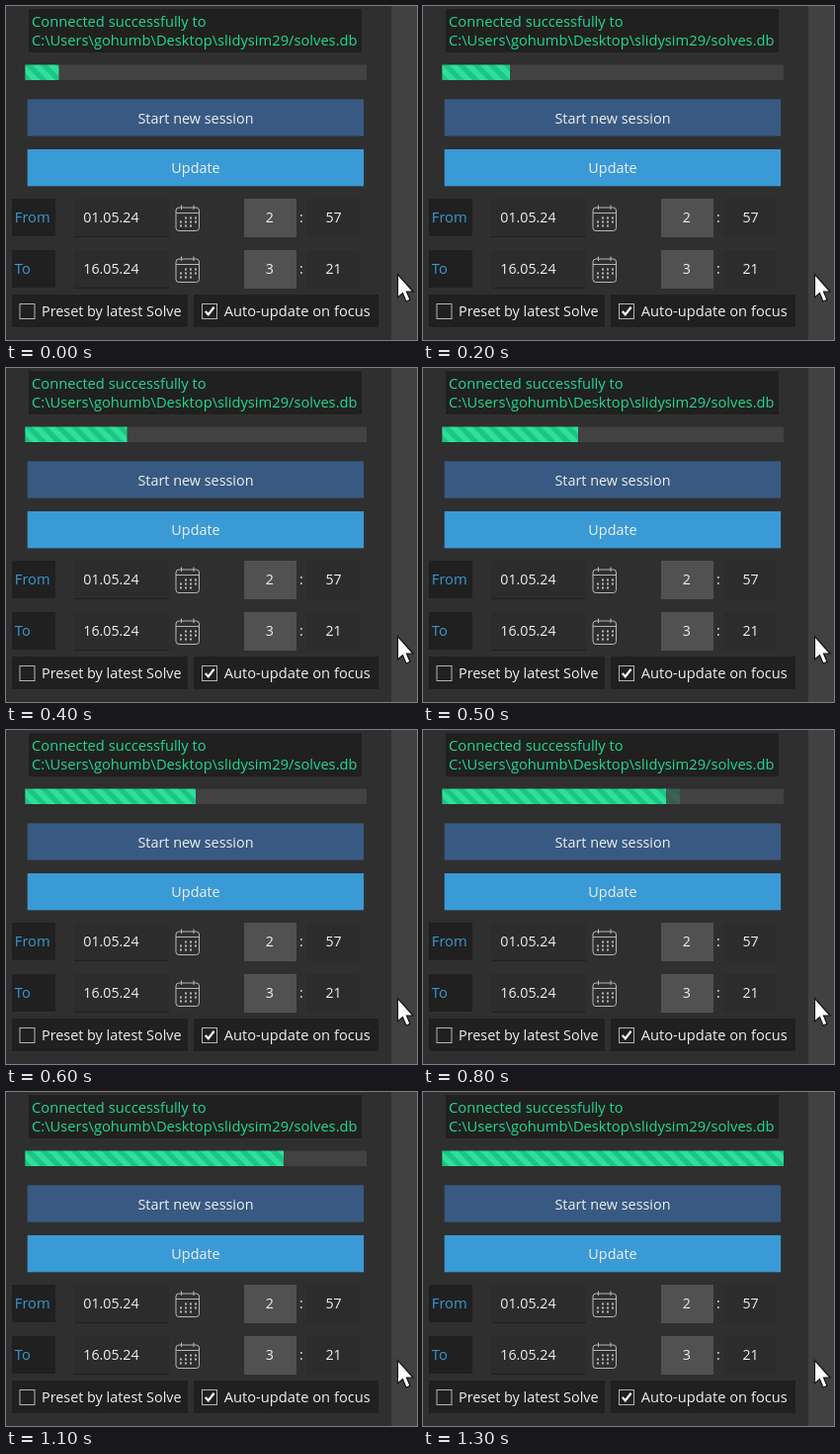
Write an HTML page that moves like this. It is 416x338 px and loops after 1400 ms.

```html
<!DOCTYPE html>
<html lang="en">
<head>
<meta charset="utf-8">
<title>Session panel</title>
<style>
  html, body { margin: 0; width: 100%; height: 100%; overflow: hidden; background: #2f2f2f; }
  svg { display: block; width: 416px; height: 338px; }
  text { font: 14.7px "Open Sans", "Noto Sans", sans-serif; fill: #efefef; white-space: pre; }
  .num { font-size: 14.2px; }
  .mid { text-anchor: middle; }
  .btn { font-size: 14.4px; }
  .green { fill: #20d990; }
  .blue { fill: #3b98d2; }
  .dark { fill: #202020; }
  .box { fill: #202020; stroke: #b4b4b4; }
</style>
</head>
<body>
<svg viewBox="0 0 416 338" xmlns="http://www.w3.org/2000/svg">
  <defs>
    <pattern id="stripes" x="19" y="59.5" width="15.5" height="15.5" patternUnits="userSpaceOnUse">
      <g transform="scale(.155)">
        <rect width="100" height="100" fill="#2ee09c"/>
        <path d="M0 0H48L100 52V100ZM0 52L48 100H0Z" fill="#1bc583"/>
      </g>
    </pattern>
    <g id="calendar" fill="none" stroke="#b8b8b8">
      <rect x="172" y="204" width="23.5" height="23.5" rx="3"/>
      <path d="M172 209.5H195.5M177.5 201.5V206M190 201.5V206"/>
      <path d="M181 214.5H193M176 218.5H193M176 222.5H188" stroke-width="2" stroke-dasharray="2 3"/>
    </g>
  </defs>

  <rect width="416" height="338" fill="#2f2f2f"/>
  <rect x="390" width="26" height="338" fill="#414141"/>

  <rect class="dark" x="23" y="3" width="337" height="44"/>
  <text class="green" x="26" y="20.5">Connected successfully to</text>
  <text class="green" x="26" y="39.5">C:\Users\gohumb\Desktop\slidysim29/solves.db</text>

  <rect x="19.4" y="59.5" width="345.6" height="15.5" fill="#424242"/>
  <rect id="trail" y="59.5" height="15.5" fill="url(#stripes)" opacity=".2"/>
  <rect id="bar" x="19.4" y="59.5" height="15.5" fill="url(#stripes)"/>

  <rect x="21.7" y="94.4" width="340.4" height="37.2" fill="#385a82"/>
  <text class="btn mid" x="192" y="119">Start new session</text>
  <rect x="21.7" y="145" width="340.4" height="37.3" fill="#3a9ad6"/>
  <text class="btn mid" x="192" y="169">Update</text>

  <g id="rows"></g>

  <rect class="dark" x="6" y="292" width="178" height="33"/>
  <rect class="dark" x="190" y="292" width="187" height="33"/>
  <rect class="box" x="14" y="301.5" width="15" height="15"/>
  <text class="btn" x="36" y="314">Preset by latest Solve</text>
  <rect class="box" x="198.5" y="301.5" width="15" height="15"/>
  <path d="M201.8 309L204.8 312.2L210.6 304.8" fill="none" stroke="#fff" stroke-width="2.2"/>
  <text x="220.7" y="314">Auto-update on focus</text>

  <path d="M396.5 271.5V295L401.5 290.5L405 299L409 297.3L405.5 289H412Z" fill="#fff" stroke="#151515" stroke-width="1.2"/>
</svg>
<script>
  const byId = id => document.getElementById(id);
  const LOOP = 1400, STEP = 100, LEFT = 19.4;

  // right edge of the bar at each step
  const edges = [53.5, 70, 88, 105, 122.5, 157, 192, 219, 246, 260, 270, 281, 323, 365];
  // faint lead ahead of the bar, by step
  const trails = { 8: 14 };

  const row = (label, date, hour, minute, dy) => `
    <g transform="translate(0 ${dy})">
      <rect class="dark" x="6" y="195" width="44" height="38"/>
      <text class="blue" x="8.8" y="219">${label}</text>
      <rect x="69" y="195" width="96" height="39" fill="#2c2c2c"/>
      <rect x="69" y="233" width="96" height="1" fill="#202020"/>
      <text class="num" x="78.3" y="219">${date}</text>
      <use href="#calendar"/>
      <rect x="241" y="195" width="53" height="39" fill="#515151"/>
      <text class="num mid" x="266.7" y="219">${hour}</text>
      <text class="num mid" x="299" y="219">:</text>
      <rect x="304" y="195" width="54" height="39" fill="#2c2c2c"/>
      <text class="num mid" x="331.5" y="219">${minute}</text>
    </g>`;

  byId("rows").innerHTML =
    row("From", "01.05.24", 2, 57, 0) + row("To", "16.05.24", 3, 21, 52);

  function draw(time) {
    const step = Math.floor((time % LOOP) / STEP);
    const edge = edges[step];
    byId("bar").setAttribute("width", edge - LEFT);
    byId("trail").setAttribute("x", edge);
    byId("trail").setAttribute("width", trails[step] || 0);
  }

  function tick(now) {
    draw(now);
    requestAnimationFrame(tick);
  }
  draw(0);
  requestAnimationFrame(tick);
</script>
</body>
</html>
```
